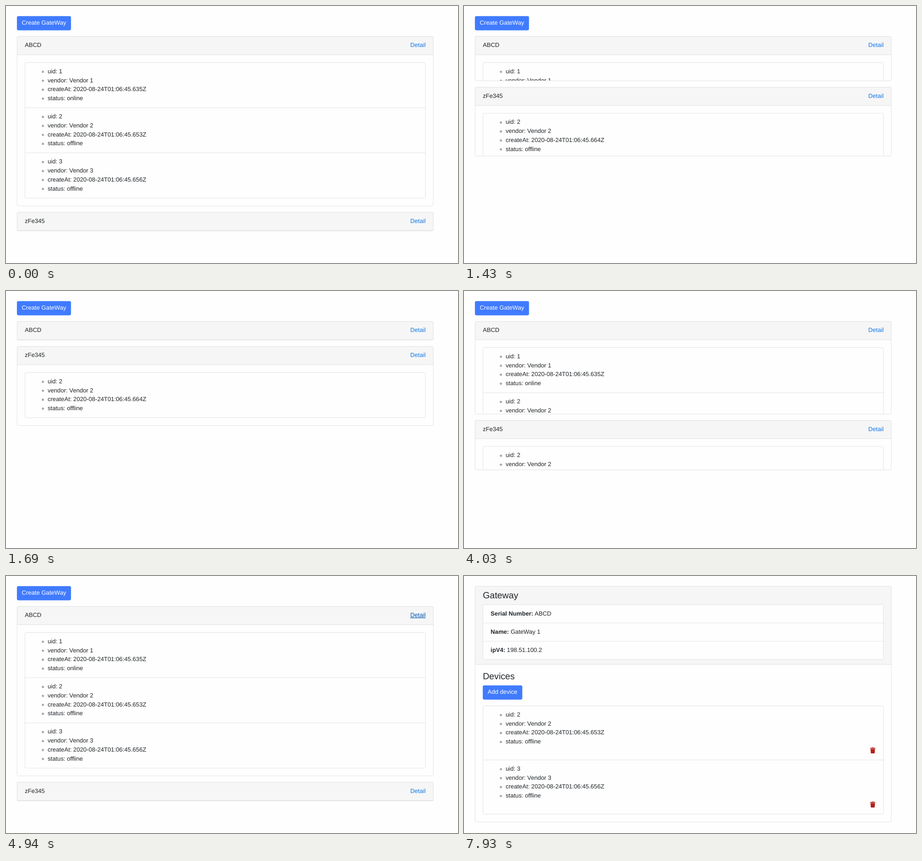
An HTML page that plays this animation: 990x565 px, repeating every 9.49 s.

```html
<!DOCTYPE html>
<html lang="en">
<head>
<meta charset="utf-8">
<title>Gateways</title>
<style>
  html, body { margin: 0; width: 100%; height: 100%; overflow: hidden; background: #fefefe; }
  #stage { display: block; width: 100vw; height: 100vh; }
  text { font: 16px "Liberation Sans", Arial, sans-serif; fill: #212529; text-rendering: geometricPrecision; white-space: pre; }
  .title { font-size: 24px; }
  .bold { font-weight: 700; }
  .label { fill: #fff; }
  .link { fill: #1177ec; text-anchor: end; }
  .hover { fill: #0056b3; text-decoration: underline; }
  .button { fill: #407bff; }
  .header { fill: #f6f6f6; }
  .border { fill: none; stroke: #dcdcdc; }
  .panel { fill: #fefefe; stroke: #dcdcdc; }
  .bullet { fill: none; stroke: #212529; }
</style>
</head>
<body>
<svg id="stage" viewBox="0 0 990 565" preserveAspectRatio="none">
  <g id="page" transform="translate(23.9 22.2) scale(.8205)"></g>
</svg>
<script>
const LOOP = 9490, TICK = 130, TRANSITION = 350;
const CLOSE_AT = 1245, REOPEN_AT = 3929, HOVER_AT = 4940, DETAIL_AT = 5590, DELETE_AT = 7930;
const WIDTH = 1112, PAD = 21, LIST_WIDTH = WIDTH - 2 * PAD, BASELINE = 16.2;
const ROW = 121, ROW_WITH_TRASH = 145;

const device = (uid, ms, status) => ({ uid, created: `2020-08-24T01:06:45.${ms}Z`, status });
const devicesA = [device(1, 635, 'online'), device(2, 653, 'offline'), device(3, 656, 'offline')];
const devicesB = [device(2, 664, 'offline')];

const text = (x, y, str, cls = '') => `<text x="${x}" y="${y}" class="${cls}">${str}</text>`;
const line = (x, y, w) => `<path class="border" d="M${x} ${y}h${w}"/>`;
const box = (x, y, w, h, cls) =>
  `<rect x="${x + .5}" y="${y + .5}" width="${w - 1}" height="${h - 1}" rx="3.5" class="${cls}"/>`;
const button = (x, y, w, str) =>
  `<rect x="${x}" y="${y}" width="${w}" height="38" rx="4" class="button"/>` +
  text(x + 13, y + 7 + BASELINE, str, 'label');

// CSS "ease": cubic-bezier(.25, .1, .25, 1)
function ease(x) {
  if (x <= 0) return 0;
  if (x >= 1) return 1;
  const bezier = (a, b, s) => 3 * a * s * (1 - s) ** 2 + 3 * b * s * s * (1 - s) + s ** 3;
  let lo = 0, hi = 1;
  for (let i = 0; i < 24; i++) {
    const mid = (lo + hi) / 2;
    if (bezier(.25, .25, mid) < x) lo = mid; else hi = mid;
  }
  return bezier(.1, 1, lo);
}

function list(y, count, rowHeight, drawRow) {
  let out = box(PAD, y, LIST_WIDTH, count * rowHeight + 1, 'panel');
  for (let i = 0; i < count; i++) {
    const top = y + i * rowHeight;
    if (i) out += line(PAD, top + .5, LIST_WIDTH);
    out += drawRow(i, top);
  }
  return out;
}

function deviceInfo(d, top) {
  const lines = [`uid: ${d.uid}`, `vendor: Vendor ${d.uid}`, `createAt: ${d.created}`, `status: ${d.status}`];
  return lines.map((str, i) => {
    const y = top + 13 + BASELINE + i * 24;
    return `<circle cx="69.4" cy="${y - 4}" r="2" class="bullet"/>` + text(82, y, str);
  }).join('');
}

const trash = (y, color) =>
  `<path transform="translate(1062 ${y})" fill="${color}"
    d="M-7 -7h4l1 -1h4l1 1h4v2.2h-14zM-6 -4h12l-.8 10.5q-.2 1.5 -1.6 1.5h-7.2q-1.4 0 -1.6 -1.5z"/>`;

function gatewayCard(y, name, devices, open, hover) {
  const full = devices.length * ROW + 41;
  const height = full * open;
  return `<g transform="translate(0 ${y})">` +
    `<rect width="${WIDTH}" height="50" rx="4" class="header"/>` +
    line(0, 49.5, WIDTH) +
    text(PAD, 13 + BASELINE, name) +
    text(WIDTH - PAD, 13 + BASELINE, 'Detail', hover ? 'link hover' : 'link') +
    (height > 0 ? `<svg y="50" width="${WIDTH}" height="${height}">` +
      list(20, devices.length, ROW, (i, top) => deviceInfo(devices[i], top)) + '</svg>' : '') +
    box(0, 0, WIDTH, 51 + height, 'border') + '</g>';
}

function overview(t) {
  const openA = t < REOPEN_AT
    ? 1 - ease((t - CLOSE_AT) / TRANSITION)
    : ease((t - REOPEN_AT) / TRANSITION);
  const heightA = 51 + (devicesA.length * ROW + 41) * openA;
  return button(0, 0, 144.4, 'Create GateWay') +
    gatewayCard(54, 'ABCD', devicesA, openA, t >= HOVER_AT) +
    gatewayCard(54 + heightA + 16, 'zFe345', devicesB, 1 - openA, false);
}

function detail(t) {
  const deleted = t >= DELETE_AT;
  const devices = deleted ? devicesA.slice(1) : devicesA;
  const fields = [['Serial Number:', 'ABCD'], ['Name:', 'GateWay 1'], ['ipV4:', '198.51.100.2']];
  const listTop = 320.4;
  return `<rect width="${WIDTH}" height="210" rx="4" class="header"/>` +
    line(0, 209.8, WIDTH) +
    text(PAD, 32.8, 'Gateway', 'title') +
    list(49.3, fields.length, 49, (i, top) =>
      `<text x="42" y="${top + 13 + BASELINE}"><tspan class="bold">${fields[i][0]}</tspan> ${fields[i][1]}</text>`) +
    text(PAD, 249.8, 'Devices', 'title') +
    button(PAD, 266, 105.5, 'Add device') +
    list(listTop, devices.length, ROW_WITH_TRASH, (i, top) =>
      deviceInfo(devices[i], top) + trash(top + 120, deleted ? '#b3201c' : '#c9210f')) +
    box(0, 0, WIDTH, listTop + devices.length * ROW_WITH_TRASH + 22, 'border');
}

const page = document.getElementById('page');
let shown = -1;

function render(elapsed) {
  const t = Math.floor(elapsed % LOOP / TICK) * TICK;
  if (t === shown) return;
  shown = t;
  // Nothing moves until the first visible transition step.
  page.innerHTML = t < DETAIL_AT ? overview(t < 1300 ? 0 : t) : detail(t);
}

const start = performance.now();
function frame() {
  render(performance.now() - start);
  requestAnimationFrame(frame);
}
frame();
</script>
</body>
</html>
```
